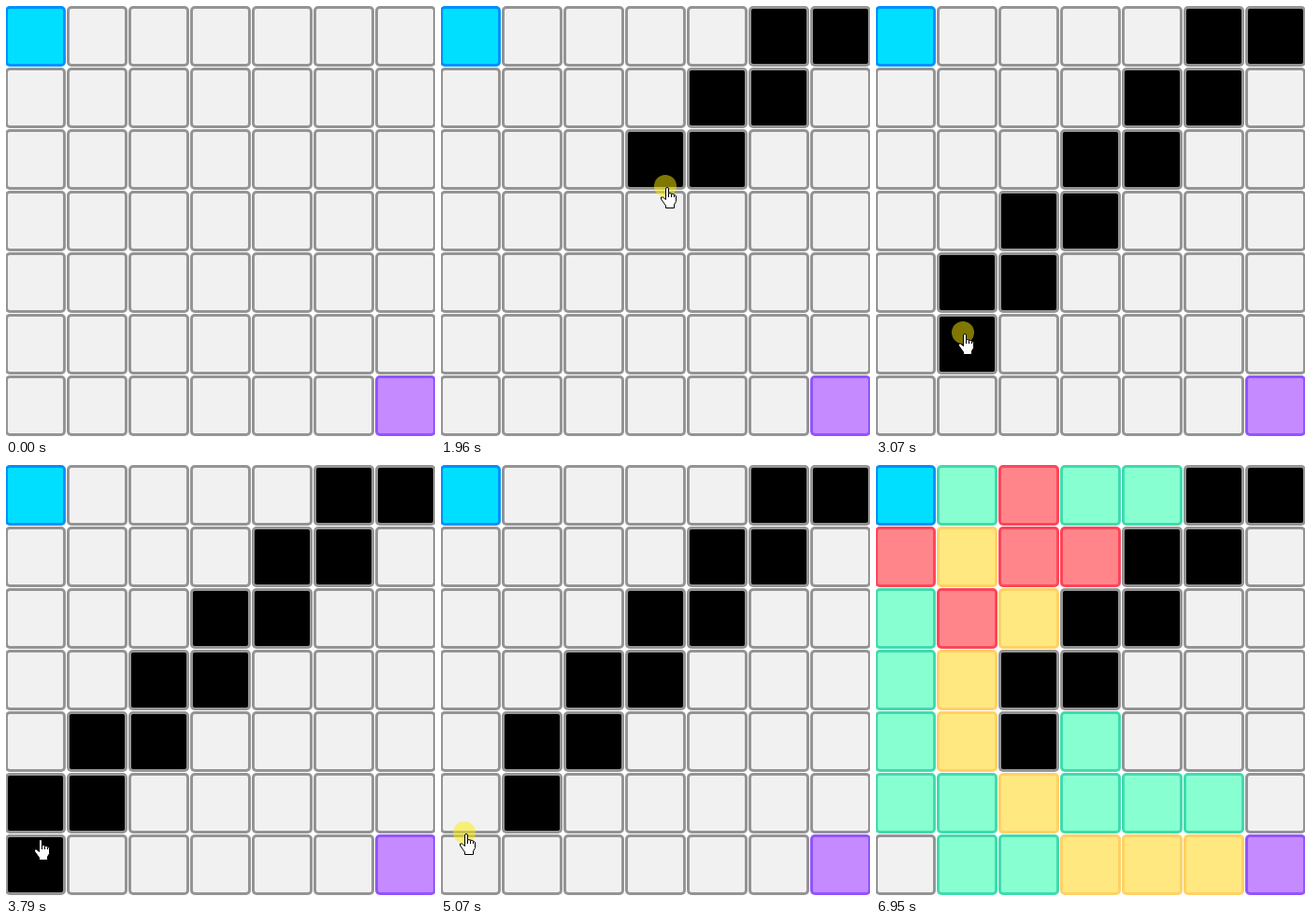
Write an HTML page with a canvas that moves like this. It is 459 px wide and 462 px high and loops after 8500 ms.

```html
<!DOCTYPE html>
<html lang="en">
<head>
<meta charset="utf-8">
<title>Grid path search</title>
<style>
  html, body { margin: 0; width: 100%; height: 100%; overflow: hidden; background: #fff; }
  canvas { display: block; }
</style>
</head>
<body>
<canvas width="459" height="462"></canvas>
<script>
const ctx = document.querySelector('canvas').getContext('2d');
const LOOP = 8500, STEP = 80, REST = 150;
const APPEAR = 610, HOVER = 770, DRAW = 920, RELEASE = 3710, ERASE = 4510, LIFT = 5700, LEAVE = 6180, SOLVED = 6950;
const PITCH = 66, LAST = 6;

// Cell kinds: [fill, border]
const KINDS = {
  '.': ['#f1f1f1', '#949494'],
  '#': ['#000', '#949494'],
  s: ['#00dfff', '#0090ff'],
  e: ['#c58aff', '#9055ff'],
  g: ['#88ffd1', '#40dbad'],
  r: ['#ff858b', '#ff4558'],
  y: ['#ffe880', '#ffd166'],
};
const solution = ['sgrgg##', 'ryrr##.', 'gry##..', 'gy##...', 'gy#g...', 'ggyggg.', '.ggyyye'];

// Strokes of the mouse begin at these times and end with a short rest
const strokes = [APPEAR, DRAW, 2990, 3310, 4270, 5780, LEAVE];

// Cursor path: time, x, y
const path = [
  [APPEAR, 446, 34], [HOVER, 429, 31], [1320, 347, 80], [1720, 268, 160], [2600, 165, 280],
  [2840, 112, 299], [3070, 93, 350], [3790, 35, 400], [4190, 69, 415], [ERASE, 30, 430],
  [5070, 25, 394], [5630, 91, 319], [6100, 342, 88],
];

const hand = new Path2D('M.5 3Q.5 1.5 2 1.5T3.5 3V7.5L6.5 8L9.5 9L11.5 10.5V16.5L9.5 20V23.5H.5V21L-4.5 14V12H-2.5L.5 14.5Z');
const knuckles = new Path2D('M3.5 7.5V12M6.5 8.5V12M9.5 9.5V12');

// Mouse movement is sampled every STEP ms within a stroke
function sampleTime(t) {
  const next = strokes.findIndex(start => start > t);
  if (next < 1) return t;
  const start = strokes[next - 1];
  const elapsed = Math.min(t - start, strokes[next] - start - REST);
  return start + Math.floor(elapsed / STEP) * STEP;
}

function cursorAt(t) {
  const i = Math.max(1, path.findIndex(([time]) => time > t));
  const [t0, x0, y0] = path[i - 1], [t1, x1, y1] = path[i];
  const k = (t - t0) / (t1 - t0);
  return [x0 + (x1 - x0) * k, y0 + (y1 - y0) * k].map(Math.round);
}

// Place of a cell along the staircase of walls, counted from the top right
const stairIndex = (col, row) => LAST - col + row;

// The cursor builds the staircase on its way down and removes it on its way back
function wallCount(t) {
  if (t < DRAW) return 0;
  if (t >= RELEASE && t < ERASE) return 13;
  if (t >= LIFT) return 9;
  const [col, row] = cursorAt(t).map(v => Math.floor(v / PITCH));
  return stairIndex(col, row) + (t < RELEASE ? 1 : 0);
}

function kindAt(col, row, walls) {
  if (col + row === 0) return 's';
  if (col + row === 2 * LAST) return 'e';
  const onStairs = col + row === LAST || col + row === LAST - 1;
  return onStairs && stairIndex(col, row) < walls ? '#' : '.';
}

function roundRect(x, y, size, radius, color) {
  ctx.fillStyle = color;
  ctx.beginPath();
  ctx.roundRect(x, y, size, size, radius);
  ctx.fill();
}

function drawCell(col, row, kind) {
  const [fill, border] = KINDS[kind];
  const x = col * PITCH - 1, y = row * PITCH;
  roundRect(x, y, 65, 5, border);
  roundRect(x + 3, y + 3, 59, 2, fill);
}

function drawCursor(t) {
  ctx.save();
  ctx.translate(...cursorAt(t));
  if ((t >= HOVER && t < RELEASE) || (t >= ERASE && t < LIFT)) {
    ctx.fillStyle = 'rgba(255, 238, 0, 0.5)';
    ctx.beginPath();
    ctx.arc(0, 0, 12, 0, Math.PI * 2);
    ctx.fill();
  }
  ctx.fillStyle = '#fff';
  ctx.strokeStyle = '#000';
  ctx.fill(hand);
  ctx.stroke(hand);
  ctx.stroke(knuckles);
  ctx.restore();
}

function draw(time) {
  const t = sampleTime(time), walls = wallCount(t);
  ctx.fillStyle = '#fff';
  ctx.fillRect(0, 0, 459, 462);
  for (let row = 0; row <= LAST; row++) {
    for (let col = 0; col <= LAST; col++) {
      drawCell(col, row, t >= SOLVED ? solution[row][col] : kindAt(col, row, walls));
    }
  }
  if (t >= APPEAR && t < LEAVE) drawCursor(t);
}

const began = performance.now();
function frame() {
  draw((performance.now() - began) % LOOP);
  requestAnimationFrame(frame);
}
frame();
</script>
</body>
</html>
```
